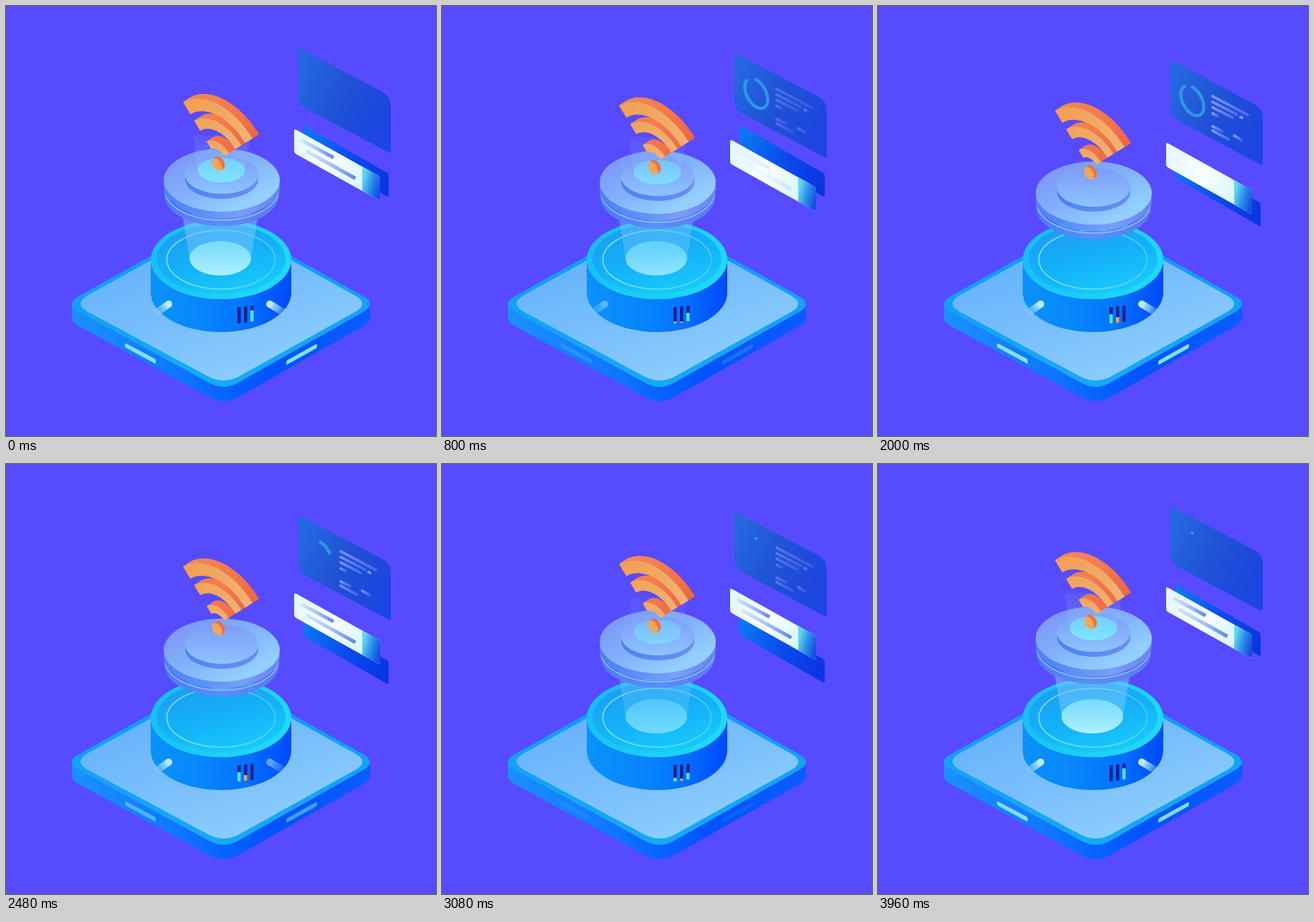
Recreate the animation shown at these times as an HTML page. Size 600 by 600 pixels, loop 4000 ms.

```html
<!DOCTYPE html>
<html lang="en">
<head>
<meta charset="utf-8">
<title>Isometric router</title>
<style>
html, body { margin: 0; width: 100%; height: 100%; overflow: hidden; background: #574bff; }
svg { display: block; width: 100vw; height: 100vh; }
</style>
</head>
<body>
<svg id="stage" viewBox="0 0 600 600" xmlns="http://www.w3.org/2000/svg"></svg>
<script>
const LOOP = 4000;
const stage = document.getElementById('stage');
const clamp = x => Math.max(0, Math.min(1, x));
const easeInOut = x => x < .5 ? 4 * x ** 3 : 1 - 4 * (1 - x) ** 3;
const easeOut = x => 1 - (1 - x) ** 3;
const xy = p => p.map(v => v.toFixed(2)).join(' ');

// Markup helpers
let defs = '', count = 0;
function grad(x1, y1, x2, y2, ...stops) {
  const id = 'g' + count++;
  const marks = stops.map((s, i) => {
    const [color, alpha = 1] = [].concat(s);
    return `<stop offset="${i / (stops.length - 1)}" stop-color="${color}" stop-opacity="${alpha}"/>`;
  }).join('');
  defs += `<linearGradient id="${id}" gradientUnits="userSpaceOnUse" x1="${x1}" y1="${y1}" x2="${x2}" y2="${y2}">${marks}</linearGradient>`;
  return `url(#${id})`;
}
const path = (d, fill, extra = '') => `<path d="${d}" fill="${fill}" ${extra}/>`;
const oval = (cx, cy, rx, ry, fill, extra = '') =>
  `<ellipse cx="${cx}" cy="${cy}" rx="${rx}" ry="${ry}" fill="${fill}" ${extra}/>`;
const line = (x1, y1, x2, y2, color, w, extra = '') =>
  `<path d="M${x1} ${y1}L${x2} ${y2}" fill="none" stroke="${color}" stroke-width="${w}" ${extra}/>`;
const group = (id, body) => `<g id="${id}">${body}</g>`;
const poly = pts => 'M' + pts.map(xy).join('L') + 'Z';

// Polygon with rounded corners; r is one radius or one per corner
function rounded(pts, r) {
  const n = pts.length;
  return pts.map((p, i) => {
    const radius = Array.isArray(r) ? r[i] : r;
    const toward = q => {
      const k = radius / Math.hypot(q[0] - p[0], q[1] - p[1]);
      return [p[0] + (q[0] - p[0]) * k, p[1] + (q[1] - p[1]) * k];
    };
    const a = toward(pts[(i + n - 1) % n]), b = toward(pts[(i + 1) % n]);
    return `${i ? 'L' : 'M'}${xy(a)}Q${xy(p)} ${xy(b)}`;
  }).join('') + 'Z';
}

// Side wall of an upright cylinder
const wall = (cx, cy, rx, ry, h) =>
  `M${cx - rx} ${cy}v${h}A${rx} ${ry} 0 0 0 ${cx + rx} ${cy + h}v${-h}A${rx} ${ry} 0 0 1 ${cx - rx} ${cy}Z`;

function platform() {
  const rim = [[82, 416], [300, 294], [518, 416], [304, 537]];
  const face = [[93, 415.5], [300, 300.5], [508, 415.5], [304, 528.5]];
  const low = rim.map(([x, y]) => [x, y + 20]);
  const side = grad(92, 0, 508, 0, '#1b90fb', '#1078ff', '#0052ff', '#0a5cff');
  const slots = [
    [[166, 470], [209, 493], [209, 499.5], [166, 476]],
    [[391, 495], [434, 471], [434, 477], [391, 501]]
  ].map(p => path(rounded(p, 2), '#86e0ff')).join('');
  return path(rounded(low, 23), side)
    + path(poly([[92, 413], [508, 413], [508, 437], [92, 437]]), side)
    + path(rounded(rim, 23), grad(0, 340, 0, 535, '#0f9df6', '#16aaf6'))
    + path(rounded(face, 25), grad(250, 320, 320, 525, '#64b2fc', '#78befc', '#8ccdfd'))
    + group('slots', slots);
}

function cylinder() {
  const rod = (id, x, y, dx, dy) => group(id, line(x, y, x + dx, y + dy,
    grad(x, y, x + dx, y + dy, '#bfe9ff', ['#8fd0ff', .75], ['#8fd0ff', .05]), 10)
    + oval(x, y, 5, 5, '#bfe9ff'));
  const bars = [[323, 420], [332, 419], [341, 418]].map(([x, y], i) =>
    `<rect x="${x}" y="${y}" width="4.6" height="23" rx="1.4" fill="#13208f"/>`
    + `<rect id="bar${i}" x="${x}" width="4.6" rx="1" fill="${i === 1 ? '#ff9a3c' : '#4fe3ff'}"/>`).join('');
  return path(wall(300, 354, 98, 55, 46), grad(202, 0, 398, 0, '#0a92fa', '#0888fc', '#0474ff', '#0048ff'))
    + oval(300, 354, 98, 55, grad(220, 320, 380, 400, '#16c0f5', '#1cdcf8'))
    + oval(300, 353, 90, 49, grad(280, 304, 305, 402, '#1c9ef3', '#14b0f8', '#18c8fb'))
    + oval(300, 354, 75.5, 41, 'none', `stroke="${grad(224, 380, 375, 330, '#7ce8ff', ['#6fe0ff', .55])}" stroke-width="1.6"`)
    + rod('rodL', 227, 416, -20, 14) + rod('rodR', 368, 416, 22, 13) + bars;
}

function lowerBeam() {
  return path('M246 290L256 352A43 24 0 0 0 342 352L352 290Z',
    grad(0, 290, 0, 376, ['#7fc0ff', .55], ['#8fdcff', .32]))
    + oval(299, 352, 43, 24, grad(0, 328, 0, 376, ['#80e2ff', .85], ['#b4f2ff', .95]));
}

function disc() {
  return path(wall(301, 254, 80, 43, 10), grad(220, 0, 381, 0, '#4a7cf2', '#5f8cf6', '#5c78ee'))
    + oval(301, 256, 79.5, 43, 'none', 'stroke="#85c8ff" stroke-width="1.4"')
    + path(wall(301, 243, 81, 44, 9), grad(220, 0, 381, 0, '#4a80f5', '#5e90f8', '#7a9ef8', '#6685f2'))
    + oval(301, 243, 81, 44, grad(270, 200, 315, 287, '#7d9af7', '#82b2fc', '#92d0ff'))
    + path(wall(301, 235, 51, 27, 7), grad(250, 0, 352, 0, '#4c82f3', '#5b8af5', '#6c8cf3'))
    + oval(301, 235, 51, 27, grad(0, 208, 0, 262, '#7d9cf6', '#8cc4ff'))
    + group('upperBeam',
      oval(300.5, 229, 33, 17, grad(0, 212, 0, 246, '#6fd3ff', '#7df0ff'))
      + path('M261 180L267.5 229A33 17 0 0 0 333.5 229L341 180Z',
        grad(0, 180, 0, 246, ['#8ca8ff', .12], ['#7cd8ff', .42])));
}

// Wi-Fi sign: quarter arcs on a slanted plane, pushed back along a depth vector
function wifi() {
  const at = (r, a, cx = 295.5, cy = 215) => [
    cx + r * (-48.5 * Math.cos(a) + 48.5 * Math.sin(a)),
    cy + r * (-81 * Math.cos(a) - 30 * Math.sin(a))];
  const arc = (r, end = Math.PI / 2, c = []) =>
    Array.from({ length: 33 }, (_, i) => at(r, end * i / 32, ...c));
  const push = (pts, dx, dy) => pts.map(([x, y]) => [x + dx, y + dy]);
  const rimFill = grad(250, 125, 350, 190, '#f58a50', '#f67a4a', '#ee6440');
  const faceFill = grad(250, 150, 340, 185, '#f3a052', '#f0a960', '#f3b272');
  const bands = [[1, .79], [.68, .506], [.32, .185]];
  const rims = bands.map(([r]) =>
    path(poly([...arc(r), ...push(arc(r), 9, -6).reverse()]), rimFill)).join('');
  const faces = bands.map(([r, s]) =>
    path(poly([...arc(r), ...arc(s).reverse()]), faceFill)).join('');
  const dot = arc(.1, Math.PI * 2, [294.5, 221.5]);
  const back = [1, 2, 3, 4].map(i => path(poly(push(dot, i, -i * .7)), '#ee6f43')).join('');
  return rims + faces + back + path(poly(dot), '#f4a658');
}

function panel() {
  const ring = Array.from({ length: 61 }, (_, i) => {
    const a = (-90 + 318 * i / 60) * Math.PI / 180;
    return [438.5 + 16 * Math.cos(a), 115 + 19 * Math.sin(a) + 9 * Math.cos(a)];
  });
  const rows = [[467, 109, 516, 135], [467, 117, 501, 134.5], [506, 138, 508, 139], [467, 124.5, 495, 139],
    [467, 133, 474, 136.5], [467, 151, 480, 157.5], [497, 164, 507, 170], [467, 157, 489, 169]];
  const text = rows.map(([a, b, c, d], i) => line(a, b, c, d,
    i === 2 ? '#7e9cff' : grad(a, b, c, d, '#7d94f8', ['#5f7cf2', .7]), 3.8, 'stroke-linecap="round"')).join('');
  return path(rounded([[408, 58], [537, 126], [537, 206], [408, 137.5]], [5, 13, 4, 12]),
    grad(408, 100, 537, 165, '#2567e0', '#1f50d4', '#1c45e2'))
    + path('M' + ring.map(xy).join('L'), 'none',
      'id="ring" pathLength="1" stroke="#2e97e4" stroke-width="4.4" stroke-linecap="round"')
    + group('rows', text);
}

const backCard = () => path(rounded([[415, 166], [534, 234], [534, 267], [415, 199]], 3),
  grad(415, 190, 534, 245, '#0b78f2', '#0a4cee', '#0a34e4'));

function frontCard() {
  const bar = (a, b, c, d) => line(a, b, c, d, grad(a, b, c, d, ['#9cc4fa', .35], '#5f86ea'), 5);
  return path(rounded([[402, 171], [522, 238], [522, 272], [402, 205]], 3.5),
    grad(402, 190, 500, 245, '#e4f6ff', '#fafeff', '#d8f6ff'))
    + path('M497 224L519 236.3Q522 238 522 241.5V268.5Q522 272 519 270.3L497 258Z',
      grad(497, 245, 522, 252, '#62d6f2', '#2a8eea', '#1550de'))
    + group('bars', bar(412, 187, 457, 211.5) + bar(419, 202.5, 487.5, 240.5));
}

const art = platform() + cylinder() + group('lowerBeam', lowerBeam()) + group('disc', disc())
  + group('wifi', wifi()) + group('panel', panel()) + group('backCard', backCard())
  + group('frontCard', frontCard());
stage.innerHTML = `<defs>${defs}</defs><rect width="600" height="600" fill="#574bff"/>${art}`;

const el = {};
stage.querySelectorAll('g[id], rect[id], path[id]').forEach(n => el[n.id] = n);
const shift = (id, y) => el[id].setAttribute('transform', `translate(0 ${y.toFixed(3)})`);
const fade = (id, a) => el[id].setAttribute('opacity', clamp(a).toFixed(3));
function fill(i, base, h) {
  el['bar' + i].setAttribute('y', base - h);
  el['bar' + i].setAttribute('height', h);
}

function render(t) {
  const p = 1 - Math.abs(1 - t / 2000);
  const half = t % 2000;
  const ramp = (a, b, x = t) => clamp((x - a) / (b - a));
  const blink = (a, b, c, d) => 1 - ramp(a, b, half) + ramp(c, d, half);

  shift('wifi', 12 * p);
  shift('panel', 17 * p);
  shift('disc', 18 * easeInOut(clamp((p - .08) / .92)));
  shift('backCard', 41 * (ramp(1280, 2000) - ramp(3040, 4000)));

  const drop = t < 2000 ? easeOut(t / 2000) : 1 - easeOut(t / 2000 - 1);
  shift('frontCard', 19 * drop);
  fade('bars', (.83 - drop) / .3);

  const swap = clamp((p - .33) / .33);
  fade('lowerBeam', 1 - swap);
  fade('upperBeam', 1 - swap);
  fill(0, 443, 13 * swap);
  fill(1, 442, 8 * swap);
  fill(2, 440.5, 16 * (1 - swap));

  fade('slots', Math.abs(1 - half / 1000));
  fade('rodL', blink(440, 1080, 1400, 1960));
  fade('rodR', blink(200, 760, 1300, 1900));

  const sweep = easeInOut(ramp(0, 1000)) - easeInOut(ramp(2000, 2760));
  el.ring.setAttribute('stroke-dasharray', `${Math.max(.001, sweep).toFixed(4)} 2`);
  fade('ring', t < 30 ? 0 : 1);
  fade('rows', p * 1.2);
}

const start = performance.now();
function tick() {
  render((performance.now() - start) % LOOP);
  requestAnimationFrame(tick);
}
render(0);
requestAnimationFrame(tick);
</script>
</body>
</html>
```
